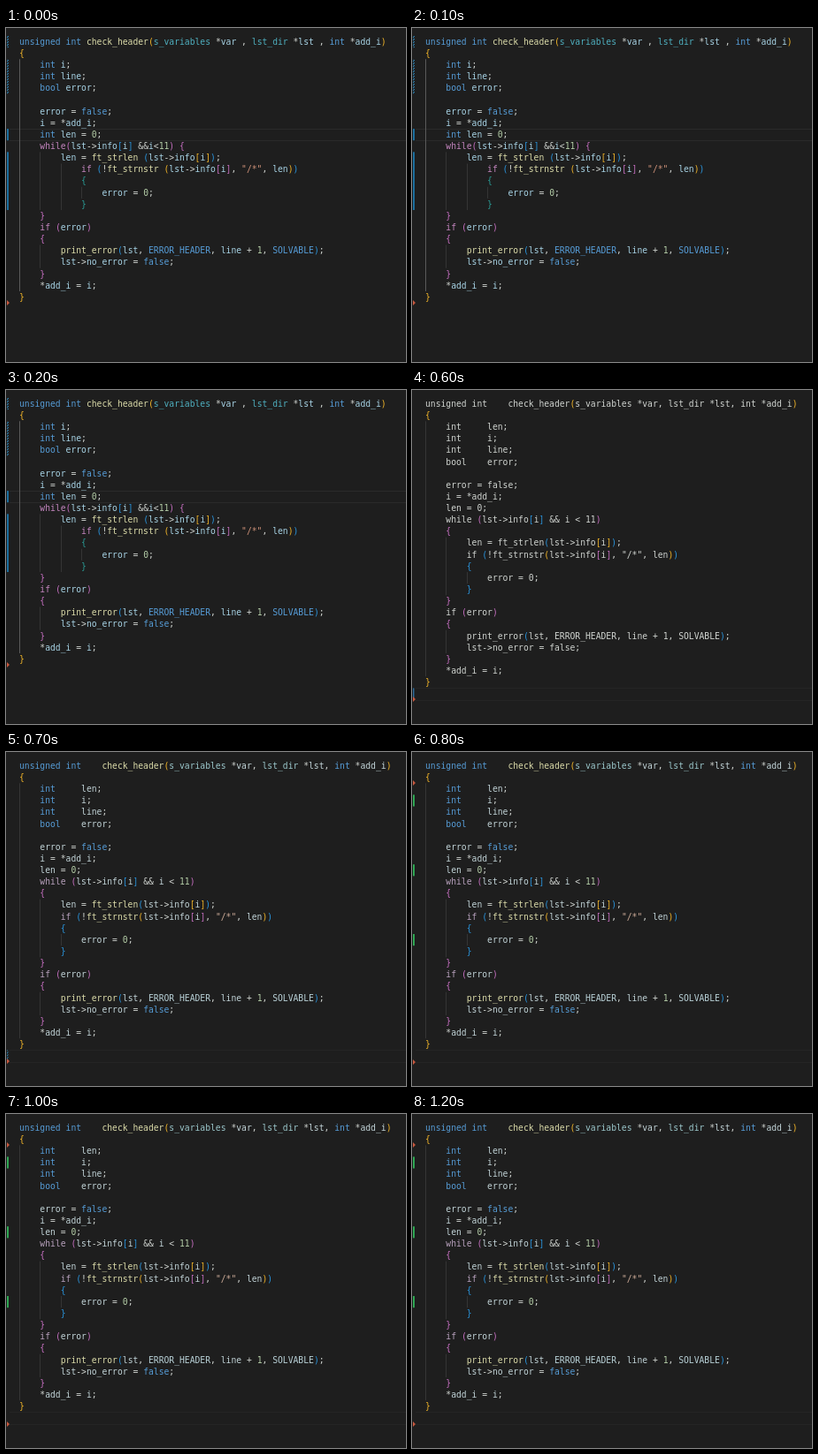
Write an HTML page that moves like this. It is 452 px wide and 378 px high and loops after 2.1 s.

```html
<!DOCTYPE html>
<html lang="en">
<head>
<meta charset="utf-8">
<title>Code formatting</title>
<style>
  html, body { margin: 0; width: 100%; height: 100%; overflow: hidden; background: #1e1e1e; }
  svg { display: block; width: 452px; height: 378px; }
  text { font: 9.7px "DejaVu Sans Mono", monospace; white-space: pre; fill: #d0d4d0; }
  .k { fill: #569cd6; }
  .c { fill: #c586c0; }
  .t { fill: #4fb0c0; }
  .f { fill: #dcdcaa; }
  .v { fill: #a8d4e6; }
  .m { fill: #569cd6; }
  .n { fill: #b5cea8; }
  .s { fill: #ce9178; }
  .b0 { fill: #f0b429; }
  .b1 { fill: #c56fc0; }
  .b2 { fill: #2a94dc; }
  #before .b2.brace { fill: #2a9a94; }
  #after .c { fill: #b9a2be; }
  #after .t { fill: #9cc8cc; }
  #after .m { fill: #b8d0d6; }
  #after .v { fill: #c2d4d8; }
  #after .s { fill: #cdab98; }
  #after.plain .word { fill: #d0d4d0; }
</style>
</head>
<body>
<svg viewBox="0 0 452 378">
  <defs>
    <pattern id="hatch" width="3" height="3" patternUnits="userSpaceOnUse">
      <path d="M0 3L3 0" stroke="#2b83b5" stroke-width="1.1"/>
    </pattern>
  </defs>
  <rect width="452" height="378" fill="#1e1e1e"/>
  <g id="before"></g>
  <g id="after"></g>
</svg>
<script>
const LOOP = 2100, SWAP = 600, COLORED = 700, SAVED = 800;
const X = 15, TOP = 9, CHAR = 5.84, LINE = 13.135, BASELINE = 9.87;

const messy = `unsigned int check_header(s_variables *var , lst_dir *lst , int *add_i)
{
    int i;
    int line;
    bool error;

    error = false;
    i = *add_i;
    int len = 0;
    while(lst->info[i] &&i<11) {
        len = ft_strlen (lst->info[i]);
            if (!ft_strnstr (lst->info[i], "/*", len))
            {
                error = 0;
            }
    }
    if (error)
    {
        print_error(lst, ERROR_HEADER, line + 1, SOLVABLE);
        lst->no_error = false;
    }
    *add_i = i;
}`;

const tidy = `unsigned int    check_header(s_variables *var, lst_dir *lst, int *add_i)
{
    int     len;
    int     i;
    int     line;
    bool    error;

    error = false;
    i = *add_i;
    len = 0;
    while (lst->info[i] && i < 11)
    {
        len = ft_strlen(lst->info[i]);
        if (!ft_strnstr(lst->info[i], "/*", len))
        {
            error = 0;
        }
    }
    if (error)
    {
        print_error(lst, ERROR_HEADER, line + 1, SOLVABLE);
        lst->no_error = false;
    }
    *add_i = i;
}`;

const rules = [
  [/^(unsigned|int|bool|false)$/, "k"],
  [/^(while|if)$/, "c"],
  [/^(s_variables|lst_dir)$/, "t"],
  [/^(check_header|ft_\w+|print_error)$/, "f"],
  [/^[A-Z_]+$/, "m"],
  [/^\d+$/, "n"],
  [/^"/, "s"],
  [/^\w+$/, "v"]
];

function add(parent, tag, attrs, text) {
  const el = document.createElementNS("http://www.w3.org/2000/svg", tag);
  for (const key in attrs) el.setAttribute(key, attrs[key]);
  if (text) el.textContent = text;
  return parent.appendChild(el);
}

const rowY = row => TOP + (row - 1) * LINE;

function bar(parent, x, y, width, height, fill) {
  return add(parent, "rect", { x, y, width, height, fill });
}

// Marks the gutter beside a run of rows.
function mark(parent, from, to, fill, width = 2) {
  return bar(parent, 1, rowY(from), width, (to - from + 1) * LINE, fill);
}

function guide(parent, col, from, to, fill = "#353535") {
  bar(parent, Math.round(X + col * CHAR), rowY(from), 1, (to - from + 1) * LINE, fill);
}

function currentLine(parent, row, color) {
  for (const y of [rowY(row), rowY(row + 1)]) bar(parent, 4, Math.round(y), 448, 1, color);
}

function arrow(parent, y) {
  return add(parent, "path", { d: `M1 ${y - 3}l3 3l-3 3z`, fill: "#c9583e" });
}

function write(parent, source) {
  let depth = 0;
  source.split("\n").forEach((line, i) => {
    const text = add(parent, "text", { y: rowY(i + 1) + BASELINE });
    for (const { 0: token, index } of line.matchAll(/"[^"]*"|\w+|[(){}[\]]|[^\s\w(){}[\]"]+/g)) {
      const rule = rules.find(([test]) => test.test(token));
      let kind = rule ? rule[1] + " word" : "";
      if (/[([{]/.test(token)) kind = "b" + depth++ % 3;
      else if (/[)\]}]/.test(token)) kind = "b" + --depth % 3;
      if (/[{}]/.test(token)) kind += " brace";
      add(text, "tspan", { x: X + index * CHAR, class: kind }, token);
    }
  });
}

const before = document.getElementById("before");
const after = document.getElementById("after");

currentLine(before, 9, "#2a2a2a");
guide(before, 0, 3, 22, "#5a5a5a");
guide(before, 4, 11, 15);
guide(before, 8, 12, 15);
guide(before, 12, 14, 14);
guide(before, 4, 19, 20);
mark(before, 1, 1, "url(#hatch)");
mark(before, 3, 5, "url(#hatch)");
mark(before, 9, 9, "#1b6f9f");
mark(before, 11, 15, "#1b6f9f");
arrow(before, 311);
write(before, messy);

currentLine(after, 26, "#252525");
guide(after, 0, 3, 24);
guide(after, 4, 13, 17);
guide(after, 8, 16, 16);
guide(after, 4, 21, 22);
write(after, tidy);

const pending = add(after, "g", {});
const caret = mark(pending, 26, 26, "#2b6a98", 1.5);
arrow(pending, 350);

const saved = add(after, "g", {});
for (const row of [4, 10, 16]) mark(saved, row, row, "#2ea652");
arrow(saved, 35);
arrow(saved, 351);

const show = (el, on) => { el.style.display = on ? "" : "none"; };

function draw(now) {
  const t = now % LOOP;
  show(before, t < SWAP);
  show(after, t >= SWAP);
  show(pending, t < SAVED);
  show(saved, t >= SAVED);
  // Fresh text stays plain until the highlighter catches up.
  after.classList.toggle("plain", t < COLORED);
  caret.setAttribute("fill", t < COLORED ? "#2b6a98" : "url(#hatch)");
}

const start = performance.now();
function tick() {
  draw(performance.now() - start);
  requestAnimationFrame(tick);
}
tick();
</script>
</body>
</html>
```
